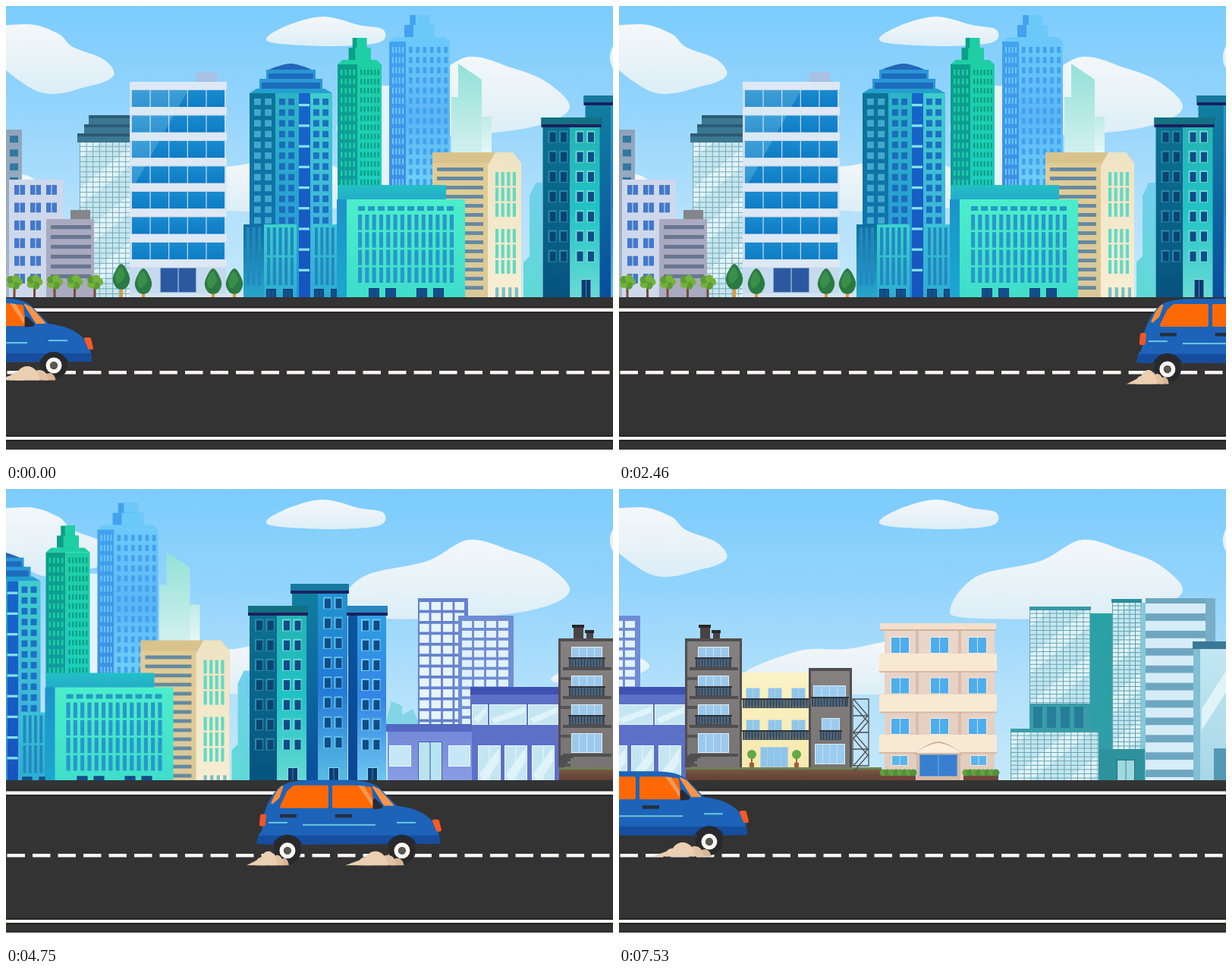
An HTML page with a canvas that plays this animation: 800 by 600 pixels, repeating every 7.59 s.

```html
<!DOCTYPE html>
<html lang="en">
<head>
<meta charset="utf-8">
<title>City drive</title>
<style>
html, body { margin: 0; width: 100%; height: 100%; overflow: hidden; background: #fff; }
canvas { display: block; width: 800px; height: 600px; }
</style>
</head>
<body>
<canvas id="stage" width="800" height="600"></canvas>
<script>
const W = 800, H = 600, GROUND = 392, LOOP = 7590, STEP = 60;
let g;

// ---- drawing helpers ----
const box = (c, x0, y0, x1, y1) => { g.fillStyle = c; g.fillRect(x0, y0, x1 - x0, y1 - y0); };
const fade = (y0, y1, ...cs) => {
  const f = g.createLinearGradient(0, y0, 0, y1);
  cs.forEach((c, i) => f.addColorStop(i / (cs.length - 1), c));
  return f;
};
const wall = (x0, y0, x1, y1, ...cs) => box(fade(y0, y1, ...cs), x0, y0, x1, y1);

function poly(c, pts, round = 0) {
  g.fillStyle = g.strokeStyle = c;
  g.beginPath();
  pts.forEach(p => g.lineTo(...p));
  g.closePath();
  g.fill();
  if (round) {
    g.lineWidth = 2 * round;
    g.lineJoin = 'round';
    g.stroke();
  }
}
// closed smooth curve through the key points
function curve(c, pts) {
  const n = pts.length, at = i => pts[(i + n) % n];
  g.fillStyle = c;
  g.beginPath();
  g.moveTo(...pts[0]);
  for (let i = 0; i < n; i++) {
    const [a, b, d, e] = [at(i - 1), at(i), at(i + 1), at(i + 2)];
    g.bezierCurveTo(b[0] + (d[0] - a[0]) / 6, b[1] + (d[1] - a[1]) / 6,
      d[0] - (e[0] - b[0]) / 6, d[1] - (e[1] - b[1]) / 6, ...d);
  }
  g.fill();
}
function disc(c, x, y, rx, ry = rx) {
  g.fillStyle = c;
  g.beginPath();
  g.ellipse(x, y, rx, ry, 0, 0, 7);
  g.fill();
}
// nx by ny cells spread evenly over an area; fx, fy are the filled shares
function cells(c, x0, y0, x1, y1, nx, ny, fx = .6, fy = .6) {
  const px = (x1 - x0) / (nx - 1 + fx), py = (y1 - y0) / (ny - 1 + fy);
  for (let j = 0; j < ny; j++)
    for (let i = 0; i < nx; i++) {
      const x = x0 + i * px, y = y0 + j * py;
      box(c, x, y, x + px * fx, y + py * fy);
    }
}
function pane(c, x, y, w, h, frame = '#d9ecf8', n = 2) {
  box(frame, x, y, x + w, y + h);
  cells(c, x + 1, y + 1, x + w - 1, y + h - 1, n, 1, .93, 1);
}
const panes = (c, xs, ...rest) => xs.forEach(x => pane(c, x, ...rest));

function glass(x0, y0, x1, y1, line = '#6aa5b5', dx = 8.8, dy = 5.6) {
  g.save();
  g.beginPath();
  g.rect(x0, y0, x1 - x0, y1 - y0);
  g.clip();
  box('#c4e7f0', x0, y0, x1, y1);
  const rise = (x1 - x0) * .8;
  for (let y = y0; y < y1 + rise; y += 62)
    poly('rgba(245,253,255,.6)', [[x0, y], [x1, y - rise], [x1, y - rise + 24], [x0, y + 24]]);
  for (let x = x0; x <= x1; x += dx) box(line, x, y0, x + 1, y1);
  for (let y = y0; y <= y1; y += dy) box(line, x0, y, x1, y + 1);
  g.restore();
}

// ---- backdrop ----
function sky() {
  wall(0, 0, W, GROUND, '#7bccfd', '#93d4fc', '#b2e0fb', '#c6e9fb');
  const cloud = (...p) => {
    const ys = p.map(q => q[1]);
    curve(fade(Math.min(...ys), Math.max(...ys), '#f3f7fa', '#e9f3f8', '#dceef7'), p);
  };
  cloud([-40, 40], [25, 24], [68, 36], [88, 54], [128, 70], [142, 91], [112, 105], [40, 112]);
  cloud([345, 40], [378, 23], [420, 14], [465, 25], [497, 31], [492, 48], [430, 53], [355, 49]);
  cloud([437, 156], [472, 115], [555, 95], [610, 67], [665, 81], [712, 100], [743, 134], [700, 158], [600, 170], [460, 170]);
  cloud([796, 65], [810, 42], [840, 60], [805, 84]);
  cloud([165, 250], [235, 214], [300, 211], [400, 200], [490, 255], [320, 271]);
  cloud([-40, 230], [20, 222], [40, 235], [10, 246]);
  cloud([719, 253], [750, 238], [830, 245], [780, 262]);
}

function road() {
  box('#fff', 0, 585, W, H);
  box('#333', 0, 384, W, 585);
  box('#282828', 0, 396, W, 405);
  box('#f6f4f1', 0, 398.5, W, 403);
  box('#242424', 0, 566, W, 574);
  box('#f6f4f1', 0, 568, W, 572);
  cells('#faf7f2', 1.5, 481, 795.5, 485.5, 24, 1, .7, 1);
}

// ---- west side ----
function smallTree(x) {
  box('#7a4a32', x - 1.5, 370, x + 1.5, 384);
  for (let a = 0; a < 5; a++)
    disc(a % 2 ? '#5b9c33' : '#74b23a', x + 6 * Math.cos(a * 1.26), 364 + 5 * Math.sin(a * 1.26), 5);
}
function bigTree(x, top) {
  box('#e09a35', x - 2, top + 26, x + 2, 384);
  curve('#2b7a42', [[x, top], [x + 11, top + 18], [x + 6, top + 32], [x - 6, top + 32], [x - 11, top + 18]]);
  curve('#3a8f4a', [[x - 1, top + 4], [x + 5, top + 16], [x - 4, top + 26], [x - 8, top + 16]]);
}

function westBlocks() {
  wall(0, 163, 21, GROUND, '#8fa4bb', '#a7b8cb');
  cells('#31789f', 5, 171, 16, 235, 1, 4, 1, .5);
  box('#ced8ec', 4, 229, 75, GROUND);
  for (let x = 11; x < 60; x += 21) cells('#4279cb', x, 236, x + 14, 366, 2, 6, .85, .55);

  glass(97, 178, 166, GROUND, '#79a9b6', 8.6, 6.7);
  for (const [x, y] of [[109, 144], [103, 156], [94, 168]]) {
    box('#3b7791', x, y, 166, y + 12);
    box('#2d5b74', x, y, 166, y + 4);
  }
  box('#85858c', 85, 269, 111, 281);
  box('#a9a9c0', 53, 281, 116, GROUND);
  cells('#687792', 59, 289, 112, 359, 1, 6, 1, .4);

  box('#a8c0e3', 251, 87, 278, 101);
  box('#c6daed', 163, 100, 290, GROUND);
  for (let i = 0, y = 100; i < 8; i++, y += 33.5) {
    box('#dde8f4', 163, y, 291, y + 10);
    if (i < 7) cells(fade(y + 11, y + 34, '#1a8bcf', '#0d7bc5'), 166, y + 11, 288, y + 33, 5, 1, .95, 1);
  }
  poly('rgba(200,240,250,.2)', [[166, 111], [240, 111], [166, 242]]);
  pane('#2c589f', 203, 345, 48, 33, '#89abd2');
  box('#d4e3ef', 163, 379, 313, GROUND);
  for (let i = 0; i < 5; i++) smallTree(11 + 26.5 * i);
  for (const x of [152, 181, 273, 301]) bigTree(x, x % 151 > 1 ? 346 : 340);
}

// ---- downtown ----
// two-faced tower with chamfered top, two-step cap and small windows
function skyscraper(x, fold, x1, y, shade, front, rows) {
  const w = x1 - x, mid = x + w / 2;
  [.16, .25].forEach((r, i) => {
    const top = y - 29 + 13 * i;
    box(shade[0], mid - w * r, top, mid + w * r, y);
    box(front[0], mid - w * r * .4, top, mid + w * r, y);
  });
  poly(front[0], [[x, y + 6], [x + 7, y], [x1 - 7, y], [x1, y + 6]]);
  wall(x, y + 6, fold, 250, ...shade);
  wall(fold, y + 6, x1, 250, ...front);
  cells(front[0], x + 4, y + 13, fold - 3, 236, 4, rows, .45);
  cells(shade[0], fold + 4, y + 13, x1 - 3, 236, 6, rows, .5);
}

function domeTower() {
  curve('#2466b9', [[344, 86], [375, 76], [405, 86], [375, 88]]);
  for (const [inset, y] of [[26, 84], [17, 96]]) {
    box('#2b96d6', 321 + inset - 4, y, 430 - inset + 4, y + 14);
    box('#1d6bbd', 321 + inset - 1, y + 5, 430 - inset + 1, y + 14);
  }
  poly('#23a0cf', [[321, 115], [330, 109], [420, 109], [430, 115]]);
  wall(321, 115, 355, GROUND, '#0d7397', '#1174bd');
  wall(355, 115, 386, GROUND, '#2cb5c4', '#2590dc');
  wall(386, 115, 401, GROUND, '#1766cb', '#1754bd');
  wall(401, 115, 430, GROUND, '#40cdcb', '#3ba5e4');
  cells('#43a9cc', 327, 122, 350, 287, 2, 12, .62);
  cells('#1c6bbd', 360, 122, 380, 287, 2, 12, .65);
  cells('#1c70c3', 405, 122, 425, 287, 2, 12, .65);
  cells('#81e1ed', 386, 129, 400, 350, 1, 9, 1, .12);
  for (const [x, x1, n, c] of [[313, 340, 3, '#0f6f9f'], [340, 383, 5, '#3cd3cd'], [403, 444, 5, '#3ac4d6']]) {
    wall(x, 288, x1, GROUND, c, '#2aa9cf');
    cells('#2388c2', x + 4, 292, x1 - 4, 368, n, 2, .55, .93);
  }
  panes('#11518f', [343, 365, 406, 428], 373, 13, 14, '#0c3567');
}

function beigeBlock() {
  poly('#d9c38d', [[562, 193], [668, 193], [679, 207], [679, GROUND], [562, GROUND]]);
  wall(562, 207, 635, GROUND, '#e1cc95', '#d9c899');
  poly(fade(193, 384, '#eee3c2', '#f7eed4'), [[635, 210], [645, 193], [668, 193], [679, 207], [679, GROUND], [635, GROUND]]);
  cells('#6489a2', 568, 213, 629, 374, 1, 14, 1, .4);
  for (const y of [219, 294]) cells('#62d9c5', 645, y, 672, y + 59, 4, 3, .55, .88);
  cells('#7bbfc5', 645, 371, 675, GROUND, 4, 1, .5, 1);
}

function wideBlock() {
  wall(437, 236, 580, 260, '#22c0c4', '#24a8cc');
  wall(436, 255, 451, GROUND, '#1c93ca', '#1ba8d0');
  wall(449, 255, 605, GROUND, '#4beecb', '#3edccb');
  cells('#239bc4', 464, 264, 590, 270, 10, 1, .7, 1);
  cells('#2799c9', 464, 275, 590, 365, 14, 4, .55, .88);
  panes('#124f8e', [478, 500, 541, 563], 372, 14, 14, '#0d3b72');
}

function downtown() {
  box('#e4f4fa', 490, 105, 512, 250);
  wall(587, 146, 640, 210, '#c0ebe8', '#f3fbfb');
  poly(fade(75, 200, '#92e1d7', '#d5f1f0'), [[587, 120], [596, 120], [596, 76], [627, 97], [627, 200], [587, 200]]);
  poly(fade(233, 384, '#73cfee', '#5ed9d5'), [[682, GROUND], [682, 338], [690, 330], [690, 250], [698, 233], [707, 233], [707, GROUND]]);
  skyscraper(505, 527, 585, 41, ['#42a2ef', '#3e8de4'], ['#6bc9fa', '#5cb5f5', '#72d4f5'], 14);
  skyscraper(437, 463, 495, 71, ['#0b9f88', '#109aa3'], ['#1dcfa3', '#1bcfc0'], 13);
  domeTower();
  beigeBlock();
  wideBlock();
}

// ---- teal trio ----
function slab(x, fold, x1, y, shade, front, roof, rows) {
  wall(x + 2, y + 8, fold, GROUND, ...shade);
  wall(fold, y + 8, x1 - 2, GROUND, ...front);
  box('#1b2060', x, y, x1, y + 13);
  box(roof, x, y, x1, y + 9);
  const columns = (c, edge, a) => {
    for (const k of [0, 14.5])
      for (let j = 0; j < rows; j++) {
        const l = a + k, t = y + 17.5 + j * 26.2;
        box(edge, l, t, l + 11, t + 16);
        box(c, l + 2, t + 2, l + 10, t + 15);
      }
  };
  if (fold - x > 37) columns('#0a4470', '#288ca9', x + 9);
  columns('#0f4c88', front[2], x1 - (x1 - fold > 40 ? 34 : 35));
  pane('#0d3b72', x1 - 27, 367, 14, 25, '#8bdce5');
}
function tealTrio() {
  slab(375, 411, 452, 125, ['#107fa0', '#0a4e9d'], ['#2196cf', '#2378d8', '#5cc1e5'], '#157a9f', 8);
  slab(319, 357, 398, 154, ['#0b7292', '#075380'], ['#26b2b3', '#20c3c5', '#6adbd4'], '#137184', 7);
  slab(449, 463, 503, 154, ['#0b559e', '#0b4694'], ['#2f9ee5', '#3484e6', '#70caf0'], '#2786bf', 7);
}

// ---- offices and flats ----
function offices() {
  poly('#81d5e5', [[500, 310], [508, 280], [522, 286], [522, 298], [536, 290], [545, 310]]);
  box('#6481cd', 543, 144, 609, 312);
  cells('#e6f4fb', 545, 149, 604, 318, 4, 12, .82, .74);
  box('#6f8cd4', 596, 167, 669, 312);
  cells('#e2f2fb', 601, 174, 662, 312, 4, 11, .82, .7);

  box('#5d70c8', 612, 261, 731, GROUND);
  box('#3f51b2', 612, 261, 732, 271);
  for (const [x, y, w, h] of [[614, 284, 21, 27], [637, 284, 49, 27], [688, 284, 41, 27], [622, 338, 30, 54], [657, 338, 30, 54], [693, 338, 30, 54]]) {
    pane('#c4e6f2', x, y, w, h, '#eaf7fc', w === 30 ? 2 : 1);
    poly('#dff3f9', [[x + 2, y + h * .7], [x + w - 2, y + 3], [x + w - 2, y + h * .4], [x + 8, y + h - 2]]);
  }
  wall(503, 320, 614, GROUND, '#7488d8', '#8ba0e6');
  box('#5368c0', 493, 310, 614, 320);
  panes('#c6e7f5', [505, 583], 338, 29, 28, '#eef8fd', 1);
  pane('#b8e4f1', 543, 333, 32, 59, '#455bb6');
}

function rail(x0, y, x1) {
  box('rgba(45,65,85,.75)', x0, y, x1, y + 13);
  for (let x = x0; x < x1; x += 4) box('#323b47', x, y, x + 1, y + 13);
  box('#30333b', x0 - 1, y, x1 + 1, y + 2);
}
function brick(x0, y0, x1) {
  box('#514e50', x0, y0, x1, 367);
  wall(x0 + 3, y0 + 4, x1 - 3, 367, '#858180', '#777473');
}
function flats() {
  wall(88, 367, 346, GROUND, '#78604a', '#694538', '#583b31');
  box('#6e8050', 88, 367, 346, 370);
  for (const [x, y, w] of [[107, 180, 13], [124, 187, 9]]) {
    box('#494342', x, y, x + w, 198);
    box('#292729', x - 2, y - 1, x + w + 1, y + 3);
  }
  brick(87, 197, 162);
  for (let i = 0, y = 208; i < 4; i++, y += 38) {
    box('#514e50', 93, y + 27, 157, y + 31);
    pane('#9bc9eb', 104, y, 41, 26, '#e3eff6', 4);
    if (i < 3) rail(101, y + 14, 148);
    box('#575456', 90, y + 40, 103, y + 44);
    box('#514e50', 90, 351 + i * 4, 107 - i * 4, 355 + i * 4);
  }
  wall(162, 242, 250, 367, '#fbf3c4', '#f4e9ae');
  for (const y of [262, 304]) {
    panes('#91c6e9', [167, 196, 227], y, 19, 24, '#c8dce6');
    rail(163, y + 14, 250);
  }
  pane('#8fc4eb', 186, 340, 37, 27, '#bed2de', 4);
  for (const x of [175, 234]) {
    box('#946143', x - 1, 353, x + 1, 362);
    disc('#66a845', x, 350, 6);
    box('#a65b3c', x - 3, 361, x + 3, 367);
  }
  brick(250, 236, 307);
  pane('#9bcbee', 256, 259, 43, 27, '#d9ecf8', 4);
  rail(254, 274, 302);
  pane('#9bcbee', 267, 302, 24, 28);
  rail(265, 318, 293);
  pane('#9bcbee', 258, 336, 40, 27, '#d9ecf8', 4);

  g.strokeStyle = '#504e50';
  g.lineWidth = 1.3;
  g.beginPath();
  for (let i = 0; i < 4; i++) {
    const y = 277 + i * 22, a = i % 2 ? 328 : 309, b = 637 - a;
    for (const k of [0, 8]) {
      g.moveTo(a, y + k);
      g.lineTo(b, y + k + 22);
    }
    g.rect(308, y, 21, 22);
  }
  g.stroke();
}

function beigeFlats() {
  wall(350, 184, 495, GROUND, '#ead7cb', '#e2cbbb');
  box('#d1b39c', 344, 177, 497, 187);
  box('#f3dfcc', 344, 177, 497, 185);
  cells('#d9bdae', 391, 187, 451, 350, 2, 1, .07, 1);
  for (let y = 195; y < 310; y += 53.5) {
    panes('#4caeed', [358, 410, 460], y, 25, 22, '#f4e7dd');
    box('#d6b9a3', 343, y + 22, 498, y + 47);
    box('#f8e9d3', 343, y + 22, 498, y + 45);
  }
  panes('#58b5ed', [359, 463], 351, 22, 14, '#f4e7dd');
  curve('#cdb09b', [[390, 350], [421, 333], [452, 350], [421, 353]]);
  curve('#fbeedb', [[392, 348], [421, 335], [450, 348], [421, 350]]);
  box('#d7b9a5', 392, 348, 450, GROUND);
  pane('#397fd0', 396, 350, 50, 29, '#5d9bd8');
  for (const x0 of [345, 454]) {
    box('#734339', x0, 376, x0 + 46, GROUND);
    for (let i = 0; i < 8; i++) disc(i % 2 ? '#4e923e' : '#659e3e', x0 + 3 + i * 5.7, 374, 4.5);
  }
}

function glassBlocks() {
  wall(621, 164, 652, GROUND, '#29a2a5', '#329ca9');
  glass(541, 158, 621, 283);
  box('#3897a7', 541, 155, 622, 160);
  box('#389da9', 541, 283, 622, 317);
  cells('#267e98', 546, 287, 612, 315, 4, 1, .67, 1);
  glass(516, 319, 632, GROUND);
  box('#399da9', 516, 316, 633, 321);
  glass(650, 148, 688, 345, '#5d9dad', 7.5);
  box('#2b8d9b', 649, 145, 689, 150);
  box('#86c8d9', 688, 150, 694, GROUND);
  box('#6ea6c1', 694, 144, 773, GROUND);
  box('#79aec7', 773, 144, 786, GROUND);
  cells('#d6edf7', 694, 151, 773, 393, 1, 11, 1, .57);
  box('#2d929d', 632, 343, 693, GROUND);
  pane('#a0d8e0', 656, 357, 24, 35, '#23717f');
  box('#81bfd5', 757, 208, 800, GROUND);
  wall(766, 211, 800, GROUND, '#c2e7f2', '#a6d6e7');
  poly('#e0f4f8', [[768, 290], [800, 240], [800, 268], [768, 318]]);
  box('#397897', 756, 201, 800, 211);
  box('#5398b3', 784, 342, 800, GROUND);
}

// ---- car ----
function puff(x, s) {
  g.save();
  g.beginPath();
  g.rect(x - 90, 470, 110, 26.5);
  g.clip();
  poly('#ebcfb1', [[x - 76 * s, 497], [x - 46 * s, 486], [x - 30 * s, 497]]);
  for (const [k, r, c] of [[-6, 10, '#d8b594'], [-19, 14, '#e2c2a2'], [-49, 11, '#ebcfb1'], [-35, 19, '#ebcfb1']])
    disc(c, x + k * s, 497, r * s * .85, r);
  g.restore();
}
function wheel(x) {
  disc('#29292b', x, 477, 18);
  disc('#fbf9f5', x, 477, 10.5);
  disc('#5c5651', x, 477, 5.2);
}
function body() {
  g.save();
  g.fillStyle = '#1c63b9';
  const shell = new Path2D('M330 468L333 456Q340 450 338 436Q345 410 356 398Q364 385 400 384L450 384Q480 384 492 394L515 418Q546 421 562 438Q572 449 572 468L350 469Z');
  g.fill(shell);
  g.clip(shell);
  box('#174d9e', 328, 457, 575, 472);
  for (const x of [371, 522]) disc('#242a37', x, 477, 21);
  g.restore();

  poly('#ff8b35', [[351, 414], [357, 401], [364, 393], [359, 407]], 1.5);
  poly('#ff6905', [[363, 419], [372, 400], [380, 393], [423, 393], [423, 419]], 2);
  poly('#ff6905', [[432, 419], [432, 393], [460, 393], [480, 395], [483, 419]], 2);
  poly('#fa9853', [[464, 391], [472, 392], [484, 412], [484, 420]]);
  poly('#fa9347', [[484, 393], [492, 397], [510, 417], [499, 417]], 1);
  poly('#292b32', [[486, 411], [494, 419], [486, 420]], 2.5);
  for (const x of [361, 434]) box('#262e3d', x, 429, x + 22, 433.5);
  for (const [x, y, w] of [[391, 442, 96], [346, 439, 25], [515, 439, 25]]) box('#65c0dd', x, y, x + w, y + 2.2);
  poly('#f25427', [[336, 443], [337, 431], [341, 431], [340, 443]], 2);
  poly('#ff5924', [[564, 438], [569, 438], [572, 450], [569, 450]], 2);
}
// the body sits low on its wheels and lifts as the car sets off
function car(x, y, sag) {
  g.save();
  g.translate(x, y);
  shifted(0, sag, body);
  [371, 522].forEach(wheel);
  puff(371, .72);
  puff(522, 1);
  g.restore();
}

// ---- scenes and timing ----
function shifted(dx, dy, ...parts) {
  g.save();
  g.translate(dx, dy);
  parts.forEach(p => p());
  g.restore();
}
function build(...groups) {
  const cv = document.createElement('canvas');
  cv.width = W;
  cv.height = H;
  g = cv.getContext('2d');
  sky();
  groups.forEach(a => shifted(...a));
  road();
  return cv;
}
const scenes = [
  build([0, 0, westBlocks, downtown], [386.5, -7, tealTrio]),
  build([-384.5, 6.5, downtown], [0, 0, offices, tealTrio], [641, 0, flats]),
  build([-641, 0, offices], [0, 0, flats, beigeFlats, glassBlocks])
];
// from: cut time, go: time the car sets off, x/y: car start offset
const clips = [
  { from: 0, go: 0, x: -459, y: -3 },
  { from: 3240, go: 3310, x: -459, y: -3 },
  { from: 6550, go: 6690, x: -655, y: -13.5 }
];
const SPEED = 20.7, RAMP = 3.66, END = 50;

// constant speed with a short soft start and stop, in steps
function travel(n) {
  if (n <= 0) return 0;
  if (n < RAMP) return SPEED * n * n / (2 * RAMP);
  const m = Math.min(n, END), late = Math.max(0, m - END + RAMP);
  return SPEED * (m - RAMP / 2 - late * late / (2 * RAMP));
}

const ctx = document.getElementById('stage').getContext('2d');
const start = performance.now();
function draw() {
  const t = (performance.now() - start) % LOOP;
  const i = t < clips[1].from ? 0 : t < clips[2].from ? 1 : 2;
  const c = clips[i], d = travel(Math.floor((t - c.go) / STEP));
  g = ctx;
  g.drawImage(scenes[i], 0, 0);
  car(c.x + d, c.y + d / 162, 4 * Math.exp(-d / 80));
  requestAnimationFrame(draw);
}
draw();
</script>
</body>
</html>
```
